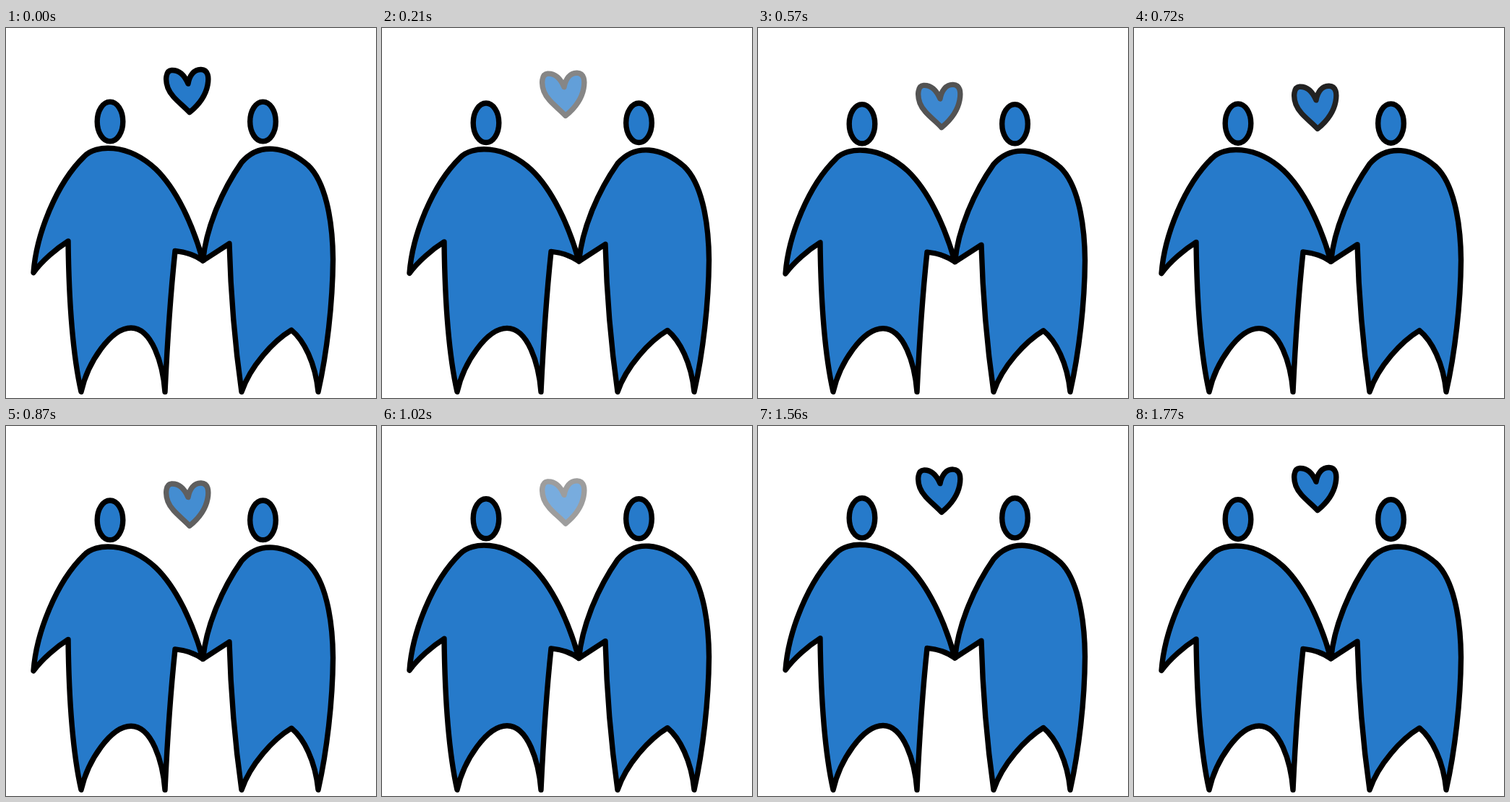
These frames come from a looping animation (512x512 px, 1800 ms). An HTML page:

```html
<!DOCTYPE html>
<html lang="en">
<head>
<meta charset="utf-8">
<title>Couple with heart</title>
<style>
html, body { margin: 0; width: 100%; height: 100%; overflow: hidden; background: #fff; }
svg { display: block; width: 100%; height: 100%; }
path, ellipse { fill: #267aca; stroke: #000; stroke-width: 7.4; stroke-linejoin: round; stroke-linecap: round; }
</style>
</head>
<body>
<svg viewBox="0 0 512 512">
  <path id="heart" d="M252 77C246 63 238 58 229 58.500C221 59 220 72 224 83C229 96 243 105 254 116.700
    C266 107 276 95 279 79C281 68 280 58 270 57.500C260 57 254 66 252 77Z"/>
  <g id="couple">
    <ellipse cx="144" cy="129.5" rx="17.8" ry="27.4"/>
    <ellipse cx="355.5" cy="129.5" rx="17.8" ry="27.4"/>
    <path d="M38 338.500C42 285 70 215 108 178C124 161 168 159 207 195C235 222 258 270 272.500 322
      C264 316 250 310 234 308.500C228 365 223 440 220 503.500C217 465 202 415 173 415
      C145 415 113 463 104 503.500C92 450 87 380 86 295C70 305 50 322 38 338.500Z"/>
    <path d="M272.500 322C277 275 300 223 326 186C350 158 387 163 418 190C441 212 452 262 452.500 320
      C452 382 444 450 432 503.500C428 463 412 432 395 418C370 433 338 468 326 503.500
      C317 440 311 370 309 298.300L272.500 322Z"/>
  </g>
</svg>
<script>
const LOOP = 1800, STEP = 30, GROUND = 503.5;
const BLUE = [38, 122, 202], BLACK = [0, 0, 0];
const couple = document.getElementById('couple');
const heart = document.getElementById('heart');

const linear = p => p;
const sineInOut = p => (1 - Math.cos(Math.PI * p)) / 2;
const onWhite = (color, alpha) => `rgb(${color.map(c => Math.round(255 + (c - 255) * alpha))})`;

// Interpolates between [time, value] keys.
function along(keys, t, ease = linear) {
  const i = Math.max(1, keys.findIndex(([time]) => time > t));
  const [t0, v0] = keys[i - 1], [t1, v1] = keys[i];
  return v0 + (v1 - v0) * ease((t - t0) / (t1 - t0));
}

const breath = [[0, 0], [570, 0.5], [1290, 1.5], [LOOP, 2]];
const drop = [[0, 0], [700, 22.8], [LOOP, 0]];
const fade = [[0, 1], [400, 0], [430, 0], [637, 1], [1260, 0], [1300, 0], [1540, 1], [LOOP, 1]];

function draw(t) {
  const scale = 1 - 0.0086 * Math.sin(Math.PI * along(breath, t));
  couple.setAttribute('transform', `translate(0 ${GROUND * (1 - scale)}) scale(1 ${scale})`);

  // The fill is two stacked layers, so it fades later than the outline.
  const alpha = along(fade, t);
  heart.setAttribute('transform', `translate(0 ${along(drop, t, sineInOut)})`);
  heart.style.fill = onWhite(BLUE, 1 - (1 - alpha) ** 2);
  heart.style.stroke = onWhite(BLACK, alpha);
}

const start = performance.now();
function tick() {
  const t = (performance.now() - start) % LOOP;
  draw(Math.floor(t / STEP) * STEP);
  requestAnimationFrame(tick);
}
draw(0);
requestAnimationFrame(tick);
</script>
</body>
</html>
```
